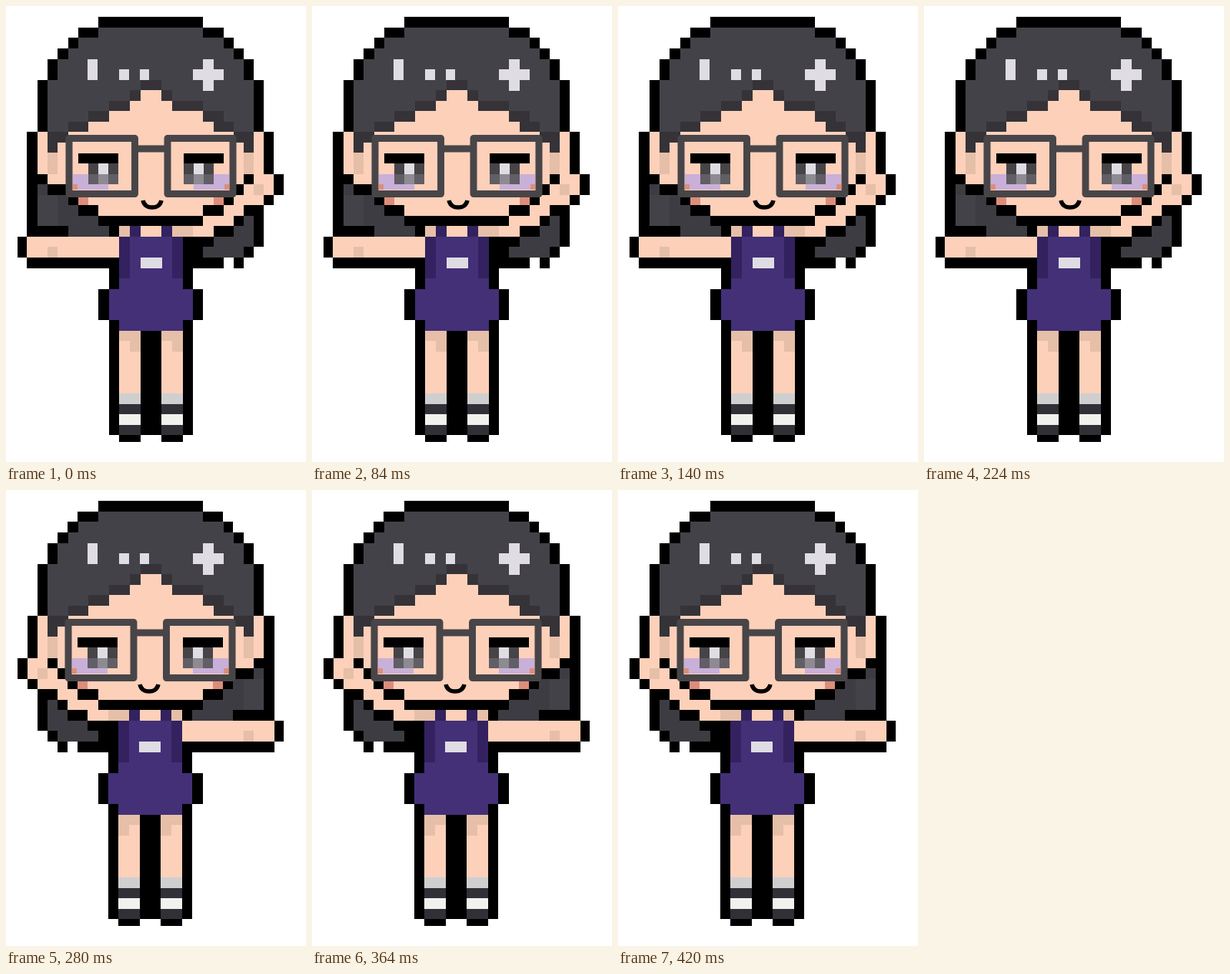
An HTML page that plays this animation: 390 px wide and 591 px high, repeating every 560 ms.

```html
<!DOCTYPE html>
<html lang="en">
<head>
<meta charset="utf-8">
<title>Waving girl</title>
<style>
  html, body { margin: 0; width: 100%; height: 100%; overflow: hidden; background: #fff; }
  svg { display: block; width: 100%; height: 100%; shape-rendering: crispEdges; }
  .pose { transform-origin: 188px 0; animation: wave 560ms step-end infinite; }
  @keyframes wave {
    0% { transform: scaleX(1); }
    50% { transform: scaleX(-1); }
  }
  .ink { fill: #000; }
  .skin { fill: #fdd0ba; }
  .shade { fill: #e6bfa9; }
  .hair { fill: #444249; }
  .fringe { fill: #353338; }
  .back { fill: #3d3c42; }
  .dress { fill: #433077; }
  .fold { fill: #33225f; }
  .shine { fill: #dfdce4; }
  .lilac { fill: #c9b0d9; }
  .blush { fill: #dd8d7c; }
  .iris { fill: #474448; }
  .low { fill: #625e65; }
  .glow { fill: #8e8a92; }
  .sock { fill: #cfcfd0; }
  .shoe { fill: #303036; }
  .white { fill: #f1f1ee; }
  .rim, .smile { fill: none; shape-rendering: auto; }
  .rim { stroke: #484548; stroke-width: 9; stroke-linejoin: round; }
  .smile { stroke: #000; stroke-width: 5.5; }
</style>
</head>
<body>
<svg viewBox="0 0 390 591" preserveAspectRatio="none">
  <g class="pose" id="body"></g>
  <g id="top"></g>
  <g class="pose">
    <g id="eye"></g>
    <use href="#eye" transform="translate(376.5 0) scale(-1 1)"/>
    <rect class="rim" x="82" y="171.5" width="85.5" height="72"/>
    <rect class="rim" x="210" y="171.5" width="85" height="72"/>
    <line class="rim" x1="171" y1="185" x2="207" y2="185"/>
    <path class="smile" d="M 178 252 Q 180 261 190 261 Q 200 261 202 252"/>
  </g>
</svg>
<script>
  const cols = [15, 27, 41, 54, 67, 81, 94, 107, 120, 134, 147, 161, 175, 188,
    202, 216, 230, 243, 256, 270, 283, 296, 309, 322, 335, 348, 361];
  const rowY = r => Math.min(565, Math.round(14.3 + 13.55 * r));
  let layer;

  const use = id => { layer = document.getElementById(id); };

  function rect(kind, x, y, w, h) {
    const el = document.createElementNS('http://www.w3.org/2000/svg', 'rect');
    el.setAttribute('class', kind);
    Object.entries({ x, y, width: w, height: h }).forEach(([k, v]) => el.setAttribute(k, v));
    layer.append(el);
  }

  // Fills grid columns a..b over rows r..r2
  function block(kind, r, a, b, r2 = r + 1) {
    rect(kind, cols[a], rowY(r), cols[b] - cols[a], rowY(r2) - rowY(r));
  }

  // One span of columns per row, going down
  function rows(kind, top, ...spans) {
    spans.forEach(([a, b], i) => block(kind, top + i, a, b));
  }

  // Rows centred on column 13
  function dome(kind, top, ...halves) {
    rows(kind, top, ...halves.map(h => [13 - h, 13 + h]));
  }

  function leg(c) {
    block('skin', 30, c, c + 2, 36);
    block('shade', 30, c, c + 2);
    block('shade', 31, c + 1, c + 2);
    block('sock', 36, c, c + 2);
    block('shoe', 37, c, c + 2);
    block('white', 38, c, c + 2);
    block('shoe', 39, c, c + 2);
    block('ink', 40, c, c + 2, 41);
  }

  function drawBody() {
    // Outline
    dome('ink', 0, 5, 7, 8, 9, 10, 10);
    block('ink', 6, 2, 24, 11);
    block('ink', 11, 1, 25, 18);
    block('ink', 15, 24, 26, 17);
    block('ink', 18, 1, 24, 22);
    block('ink', 21, 0, 10, 23);
    block('ink', 22, 1, 23, 23);
    block('ink', 23, 1, 20, 24);
    block('ink', 23, 21, 22);
    block('ink', 24, 9, 17, 40);
    block('ink', 26, 8, 18, 29);

    // Hair behind
    rows('back', 16, [2, 3], [2, 5], [2, 6], [2, 8], [5, 9]);
    block('hair', 17, 2, 4, 20);
    rows('back', 19, [22, 23], [21, 23], [19, 23], [18, 22]);

    // Face and ears
    block('skin', 11, 2, 24, 15);
    rows('skin', 15, [3, 22], [5, 21], [6, 20], [8, 18]);
    block('shade', 13, 3, 4, 15);
    block('shade', 13, 22, 23, 15);

    // Arms
    block('skin', 21, 1, 10, 23);
    rows('skin', 15, [23, 25], [22, 25], [21, 24], [20, 22], [18, 21], [15, 19]);
    block('shade', 22, 3, 4);
    block('shade', 20, 10, 11);
    block('shade', 20, 15, 17);
    block('shade', 16, 23, 24);

    // Dress
    block('skin', 20, 12, 14);
    block('dress', 21, 10, 16, 30);
    block('dress', 26, 9, 17, 29);
    block('fold', 20, 11, 12);
    block('fold', 20, 14, 15);
    block('fold', 21, 10, 11, 25);
    block('fold', 21, 15, 16, 25);
    rect('shine', 175, 326, 28, 14);

    leg(10);
    leg(14);
  }

  // Front hair keeps its side in both poses
  function drawTop() {
    dome('hair', 1, 5, 7, 8, 9, 9);
    block('hair', 6, 3, 23, 11);
    rows('skin', 7, [12, 14], [11, 15], [9, 18], [7, 19]);
    rows('fringe', 6, [12, 14], [11, 12], [9, 11], [7, 9], [5, 7], [3, 5], [3, 4]);
    rows('fringe', 7, [14, 15], [15, 18], [18, 20], [19, 21], [21, 23], [22, 23]);
    rect('shine', 106, 69, 13, 27);
    rect('shine', 147, 82, 13, 14);
    rect('shine', 174, 82, 12, 14);
    rect('shine', 256, 69, 14, 41);
    rect('shine', 243, 82, 40, 14);
  }

  function drawEye() {
    rect('lilac', 87, 218, 46, 20);
    rect('blush', 87, 231, 6, 7);
    rect('blush', 94, 248, 13, 10);
    rect('ink', 94, 191, 52, 13);
    rect('iris', 107, 204, 39, 14);
    rect('low', 107, 218, 39, 13);
    rect('shine', 120, 204, 13, 14);
    rect('glow', 120, 218, 13, 13);
  }

  use('body');
  drawBody();
  use('top');
  drawTop();
  use('eye');
  drawEye();
</script>
</body>
</html>
```
